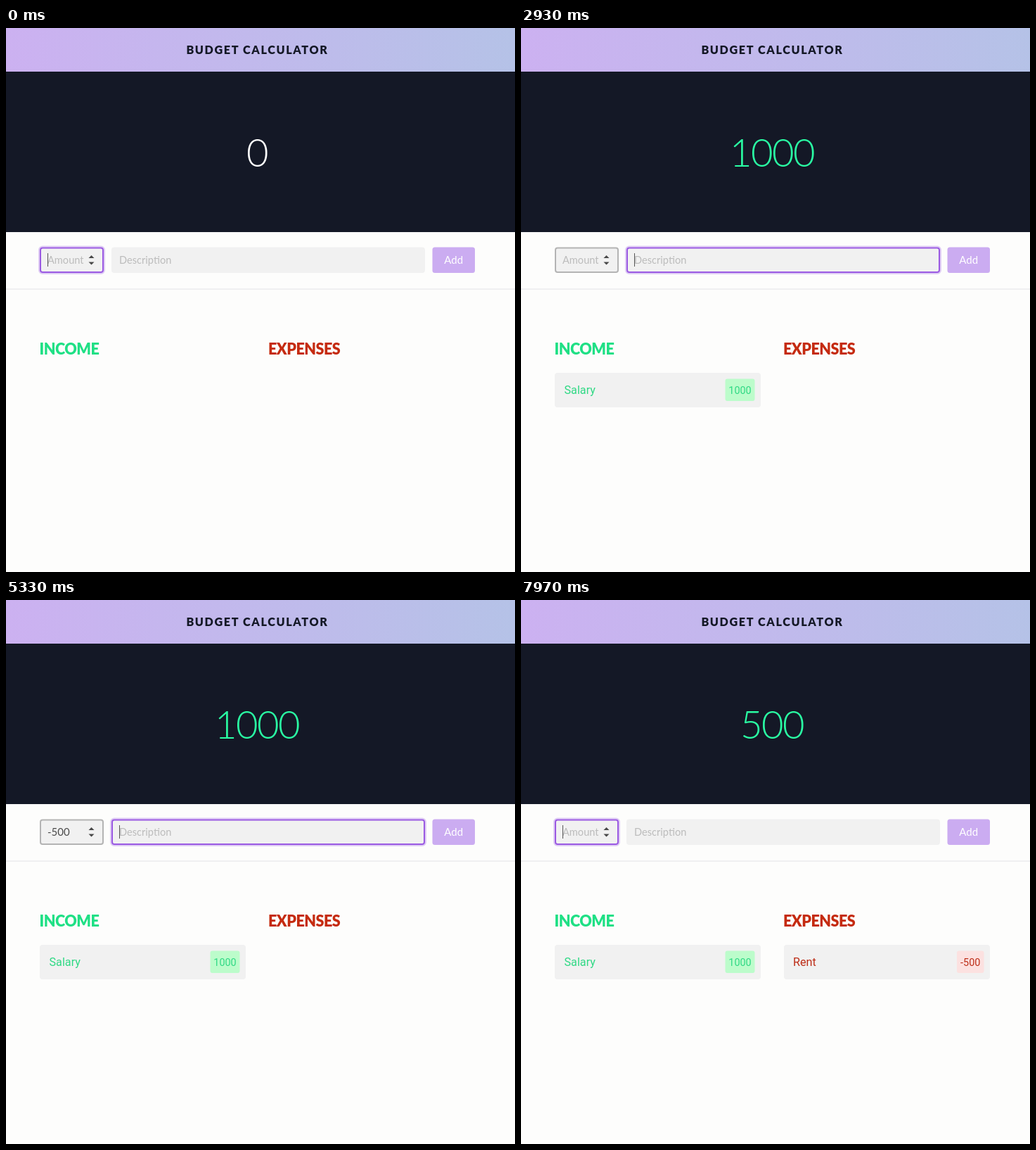
These frames come from a looping animation (724x773 px, 8000 ms). An HTML page:

```html
<!DOCTYPE html>
<html lang="en">
<head>
<meta charset="utf-8">
<title>Budget calculator</title>
<style>
  html, body { margin: 0; width: 100%; height: 100%; overflow: hidden; background: #fdfdfc; }
  svg { display: block; width: 100vw; height: 100vh; }
  text { font-family: Lato, sans-serif; white-space: pre; }
  .title { font-size: 16.2px; font-weight: 900; letter-spacing: .1em; fill: #141826; text-anchor: middle; }
  .balance { font-size: 54.4px; font-weight: 300; letter-spacing: -.029em; text-anchor: middle; }
  .heading { font-size: 21.6px; font-weight: 900; letter-spacing: -.025em; }
  .field { font-size: 14.6px; }
  .add { font-size: 15px; fill: #fff; text-anchor: middle; }
  .item text { font-family: Roboto, sans-serif; font-size: 16.2px; }
  .item .value { font-size: 14.4px; text-anchor: middle; }
  .income { fill: #1fe085; }
  .expense { fill: #c52b10; }
  .item .income { fill: #2fd984; }
  .item .expense { fill: #bd2e18; }
</style>
</head>
<body>
<svg viewBox="0 0 724 773" preserveAspectRatio="none">
  <defs>
    <linearGradient id="sky">
      <stop offset="0" stop-color="#ccb1f1"/>
      <stop offset="1" stop-color="#b5c2e7"/>
    </linearGradient>
  </defs>
  <rect width="724" height="773" fill="#fdfdfc"/>
  <rect width="724" height="62" fill="url(#sky)"/>
  <text class="title" x="357.5" y="37">BUDGET CALCULATOR</text>
  <rect y="62" width="724" height="228" fill="#141826"/>
  <text id="balance" class="balance" x="357" y="196.5"></text>

  <rect y="370" width="724" height="2" fill="#f0f0f1"/>
  <g id="amount"></g>
  <path d="M117.5 327l4-4 4 4zM117.5 332.5l4 4 4-4z" fill="#484848"/>
  <g id="desc"></g>
  <rect id="button" x="606.5" y="311.5" width="60.5" height="36.5" rx="3.5"/>
  <text class="add" x="636.7" y="335">Add</text>
  <rect id="caret" y="320" width="1" height="19" fill="#555"/>

  <text class="heading income" x="47.5" y="463.5">INCOME</text>
  <text class="heading expense" x="373" y="463.5">EXPENSES</text>
  <g id="salary" class="item">
    <rect x="48" y="490" width="293" height="49" rx="4" fill="#f1f1f1"/>
    <text class="income" x="61.5" y="520.3">Salary</text>
    <rect x="290.5" y="498.5" width="42" height="31.5" rx="3" fill="#bcfccb"/>
    <text class="value income" x="311.5" y="519.8">1000</text>
  </g>
  <g id="rent" class="item">
    <rect x="374" y="490" width="293" height="49" rx="4" fill="#f1f1f1"/>
    <text class="expense" x="387" y="520.3">Rent</text>
    <rect x="620" y="498.5" width="38.5" height="31.5" rx="3" fill="#fce1e0"/>
    <text class="value expense" x="639.2" y="519.8">-500</text>
  </g>
</svg>
<script>
const LOOP = 8000, PURPLE = '#9a59e2';
const $ = id => document.getElementById(id);

function makeField(id, x, width, textX, hint, idleStroke) {
  const box = (grow, rest) =>
    `<rect x="${x + 1 - grow}" y="${312.5 - grow}" width="${width - 2 + 2 * grow}" height="${34.5 + 2 * grow}" rx="${3 + grow}" ${rest}/>`;
  $(id).innerHTML =
    box(2, `class="glow" fill="none" stroke="${PURPLE}" stroke-opacity=".3" stroke-width="2"`) +
    box(0, 'class="box" fill="#f1f1f1" stroke-width="2"') +
    `<text class="field" x="${textX}" y="335"></text>`;
  const [glow, frame, text] = $(id).children;
  return (value, focused) => {
    glow.style.display = focused ? '' : 'none';
    frame.setAttribute('stroke', focused ? PURPLE : idleStroke);
    text.textContent = value || hint;
    text.setAttribute('fill', value ? '#4b4b4b' : '#bcbcbc');
    text.style.fontSize = value && id === 'amount' ? '15px' : '';
    if (focused) $('caret').setAttribute('x', textX + (value ? text.getComputedTextLength() : 0));
  };
}

const drawAmount = makeField('amount', 48, 91, 59, 'Amount', '#b4b4b4');
const drawDesc = makeField('desc', 150, 446, 161, 'Description', '#f1f1f1');

// [time, action]; single characters are typed into the focused field
const keys = [
  [400, '1'], [580, '0'], [710, '0'], [840, '0'], [1180, 'tab'],
  [1440, 'S'], [1570, 'a'], [1720, 'l'], [1840, 'a'], [1960, 'r'], [2090, 'y'],
  [2450, 'enter'], [3400, 'back'],
  [4250, '-'], [4480, '5'], [4640, '0'], [4770, '0'], [5060, 'tab'],
  [5700, 'R'], [5860, 'e'], [6010, 'n'], [6150, 't'],
  [6720, 'enter'], [7650, 'back']
];

function stateAt(t) {
  const s = { amount: '', desc: '', focus: 'amount', balance: 0, items: 0, last: 0 };
  for (const [time, key] of keys) {
    if (time > t) break;
    s.last = time;
    if (key === 'tab') s.focus = 'desc';
    else if (key === 'back') s.focus = 'amount';
    else if (key === 'enter') {
      s.balance += Number(s.amount);
      s.items++;
      s.amount = s.desc = '';
    } else s[s.focus] += key;
  }
  return s;
}

function render(t) {
  const s = stateAt(t);
  drawAmount(s.amount, s.focus === 'amount');
  drawDesc(s.desc, s.focus === 'desc');
  $('balance').textContent = s.balance;
  $('balance').setAttribute('fill', s.balance > 0 ? '#2affa4' : '#fff');
  $('button').setAttribute('fill', s.amount && s.desc ? PURPLE : '#cbacf1');
  $('salary').style.display = s.items > 0 ? '' : 'none';
  $('rent').style.display = s.items > 1 ? '' : 'none';
  $('caret').style.display = (t - s.last) % 1000 < 500 ? '' : 'none';
}

const start = performance.now();
function tick() {
  render((performance.now() - start) % LOOP);
  requestAnimationFrame(tick);
}
tick();
</script>
</body>
</html>
```
